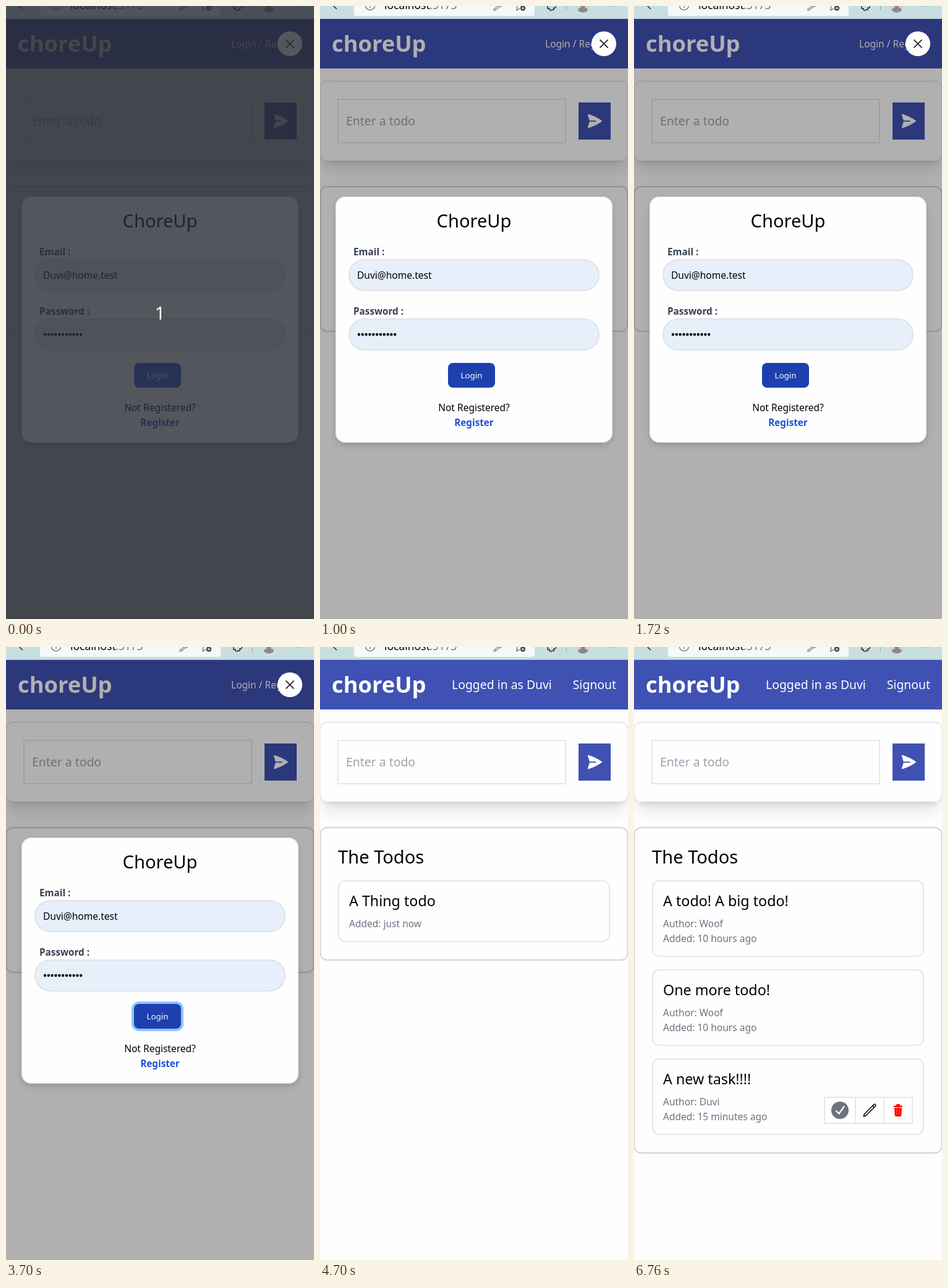
These frames come from a looping animation (498x991 px, 8 s). An HTML page with a canvas:

```html
<!DOCTYPE html>
<html lang="en">
<head>
<meta charset="utf-8">
<title>Todo list</title>
<style>
html, body { margin: 0; width: 100%; height: 100%; overflow: hidden; background: #fefefe; }
canvas { display: block; }
</style>
</head>
<body>
<canvas id="stage" width="498" height="991"></canvas>
<script>
const W = 498, H = 991, LOOP = 8000;
const ctx = document.getElementById('stage').getContext('2d');
const PAPER = '#fefefe', INDIGO = '#3f51b3', LINE = '#e5e7e9', MUTED = '#6b7280', BLUE = '#1d4ed8';
const APP = 'choreUp', USER = 'Duvi';

function text(str, x, y, size, color = '#000', weight = 400, align = 'left') {
  const scale = weight > 400 ? 0.955 : 0.97;
  ctx.font = `${weight} ${size * scale}px "Noto Sans", "Open Sans", sans-serif`;
  ctx.textAlign = align;
  ctx.fillStyle = color;
  ctx.fillText(str, x, y);
}

function rect(x, y, w, h, color) {
  ctx.fillStyle = color;
  ctx.fillRect(x, y, w, h);
}

// Rounded box with its border drawn inside the given bounds.
function box(x, y, w, h, r, fill, border, width = 0) {
  if (fill) {
    ctx.beginPath();
    ctx.roundRect(x, y, w, h, r);
    ctx.fillStyle = fill;
    ctx.fill();
  }
  if (width) {
    ctx.beginPath();
    ctx.roundRect(x + width / 2, y + width / 2, w - width, h - width, Math.max(0, r - width / 2));
    ctx.strokeStyle = border;
    ctx.lineWidth = width;
    ctx.stroke();
  }
}

// Soft shadow of a box, shrunk on every side by inset.
function shadow(x, y, w, h, r, inset, dy, blur, alpha = 0.1) {
  ctx.save();
  ctx.shadowColor = `rgba(0,0,0,${alpha})`;
  ctx.shadowBlur = blur;
  ctx.shadowOffsetY = dy;
  box(x + inset, y + inset, w - 2 * inset, h - 2 * inset, r - inset, PAPER);
  ctx.restore();
}

function disc(x, y, r, color) {
  ctx.beginPath();
  ctx.arc(x, y, r, 0, Math.PI * 2);
  ctx.fillStyle = color;
  ctx.fill();
}

function path(d, color, width) {
  const shape = new Path2D(d);
  if (width) {
    ctx.strokeStyle = color;
    ctx.lineWidth = width;
    ctx.stroke(shape);
  } else {
    ctx.fillStyle = color;
    ctx.fill(shape);
  }
}

// Path on a 24-unit grid, placed at x, y.
function icon(x, y, size, d, color, width) {
  ctx.save();
  ctx.translate(x, y);
  ctx.scale(size / 24, size / 24);
  ctx.lineCap = ctx.lineJoin = 'round';
  path(d, color, width);
  ctx.restore();
}

function browserBar() {
  rect(0, 0, W, 21, '#c8dfe1');
  rect(0, 20, W, 1, '#aebfc0');
  box(55, -20, 292, 36, 4, '#f3faf9');
  path('M20 -2L27 5', '#222', 1.4);
  path('M88.5 -1A7.5 7.5 0 0 1 73.5 -1M81 -3V3', '#555', 1.1);
  text('localhost', 104, 5, 18);
  text(':5173', 177, 5, 18, '#6d7475');
  path('M288 0L281 5V7H284V5H286L289 2M288 0A4 4 0 0 0 294 0', '#777', 1.1);
  path('M319 -1L318 7L323 4M321 -1H329', '#555', 1.1);
  disc(328, 3.5, 4.2, '#444');
  path('M325.7 3.5H330.3M328 1.2V5.8', '#f3faf9', 1);
  path('M368 0V4H371A2 2 0 0 0 375 6H378V3A2 2 0 0 0 380 -1', '#222', 1.4);
  rect(398, 0, 1, 7, '#8fa3a5');
  disc(425, 0, 11, '#d4d2d0');
  path('M417 7A8 5 0 0 1 433 7A11 11 0 0 1 417 7Z', '#8b8886');
  disc(425, -1, 4, '#8b8886');
  for (let i = 0; i < 3; i++) disc(466 + i * 5, 0, 1, '#829496');
}

function page(loggedIn, listBottom) {
  rect(0, 21, W, H - 21, PAPER);
  rect(0, 21, W, 80, INDIGO);
  text(APP, 19, 74, 38, '#fff', 700);
  if (loggedIn) {
    text('Logged in as ' + USER, 213, 68, 20, '#fff');
    text('Signout', 479, 68, 20, '#fff', 400, 'right');
  } else {
    text('Login / Register', 364, 67, 16, '#fff');
  }

  shadow(0, 121, W, 130, 12, 5, 20, 25);
  shadow(0, 121, W, 130, 12, 6, 8, 10);
  box(-0.5, 121, W + 1, 130, 12, PAPER, '#d1d3d5', 1);
  box(28, 150, 370, 72, 0, null, LINE, 2);
  text('Enter a todo', 42, 193, 20, '#9ca3af');
  rect(418, 156, 52, 60, INDIGO);
  icon(430, 172, 28, 'M3.48 2.4a.75.75 0 0 0-.93.94l2.43 7.91H13.5a.75.75 0 0 1 0 1.5H4.98l-2.43 7.9a.75.75 0 0 0 .93.95 60.5 60.5 0 0 0 18.44-9 .75.75 0 0 0 0-1.2A60.5 60.5 0 0 0 3.48 2.4Z', '#fff');

  box(-0.5, 291, W + 1, listBottom - 291, 12, PAPER, '#d2d4d6', 2);
}

function item(y, title, ...notes) {
  box(29, y, 440, 76 + 24 * notes.length, 12, null, LINE, 2);
  text(title, 47, y + 42, 24);
  notes.forEach((note, i) => text(note, 47, y + 76 + 24 * i, 16, MUTED));
}

function itemTools() {
  box(307, 727, 144, 44, 0, PAPER, LINE, 2);
  rect(357, 727, 2, 44, LINE);
  rect(403, 727, 2, 44, LINE);
  disc(333, 749, 14, MUTED);
  icon(321, 737, 24, 'M6 13L10.5 17.5L18.5 6', '#fff', 2.2);
  icon(369, 737, 24, 'M16.86 4.49l1.69-1.69a1.87 1.87 0 1 1 2.65 2.65L6.83 19.82a4.5 4.5 0 0 1-1.9 1.13l-2.68.8.8-2.69a4.5 4.5 0 0 1 1.13-1.89ZL19.5 7.12', '#000', 1.5);
  path('M420 741.5H424V740Q424 739 425 739H429Q430 739 430 740V741.5H434V744H420Z', '#f00');
  path('M421 745H433L432.3 757Q432 759 430.5 759H423.5Q422 759 421.7 757Z', '#f00');
  path('M425 747V756M429 747V756', '#ff8c8c', 0.8);
}

function field(label, y) {
  text(label, 54, y - 6, 16, '#374151', 700);
  box(46, y, 406, 52, 26, '#e6effa', '#e0e4e7', 2);
}

function loginDialog(hover, focus) {
  rect(0, 21, W, H - 21, 'rgba(0,0,0,0.308)');
  shadow(25, 308, 448, 398, 16, 2, 5, 12, 0.2);
  box(25, 308, 448, 398, 16, PAPER, '#dddedf', 1);
  text('ChoreUp', 249, 358, 30, '#000', 400, 'center');
  field('Email :', 409);
  text(USER + '@home.test', 60, 441, 16);
  field('Password :', 505);
  for (let i = 0; i < 11; i++) disc(63 + i * 5.82, 531, 2.2, '#000');
  if (focus) box(203, 573, 84, 48, 12, '#8fc5f8');
  box(207, 577, 76, 40, 8, hover ? '#1e40af' : BLUE);
  text('Login', 245, 602, 14, '#fff', 500, 'center');
  text('Not Registered?', 249, 655, 16, '#000', 400, 'center');
  text('Register', 249, 679, 16, BLUE, 700, 'center');
}

function closeButton() {
  disc(459, 61, 20, PAPER);
  path('M452.5 54.5L465.5 67.5M465.5 54.5L452.5 67.5', '#111', 1.7);
}

function countdown() {
  rect(0, 0, W, H, 'rgba(40,44,52,0.8)');
  text('1', 249, 507, 31, '#fff', 500, 'center');
}

function draw(t) {
  browserBar();
  if (t < 4700) {
    page(false, 527);
    loginDialog(t >= 1000, t >= 2200);
    closeButton();
    if (t < 100) countdown();
    return;
  }
  const loaded = t >= 4900;
  page(true, loaded ? 819 : 507);
  text('The Todos', 29, 350, 30);
  if (loaded) {
    item(377, 'A todo! A big todo!', 'Author: Woof', 'Added: 10 hours ago');
    item(521, 'One more todo!', 'Author: Woof', 'Added: 10 hours ago');
    item(665, 'A new task!!!!', 'Author: ' + USER, 'Added: 15 minutes ago');
    itemTools();
  } else {
    item(377, 'A Thing todo', 'Added: just now');
  }
}

function tick() {
  draw(performance.now() % LOOP);
  requestAnimationFrame(tick);
}
tick();
</script>
</body>
</html>
```
